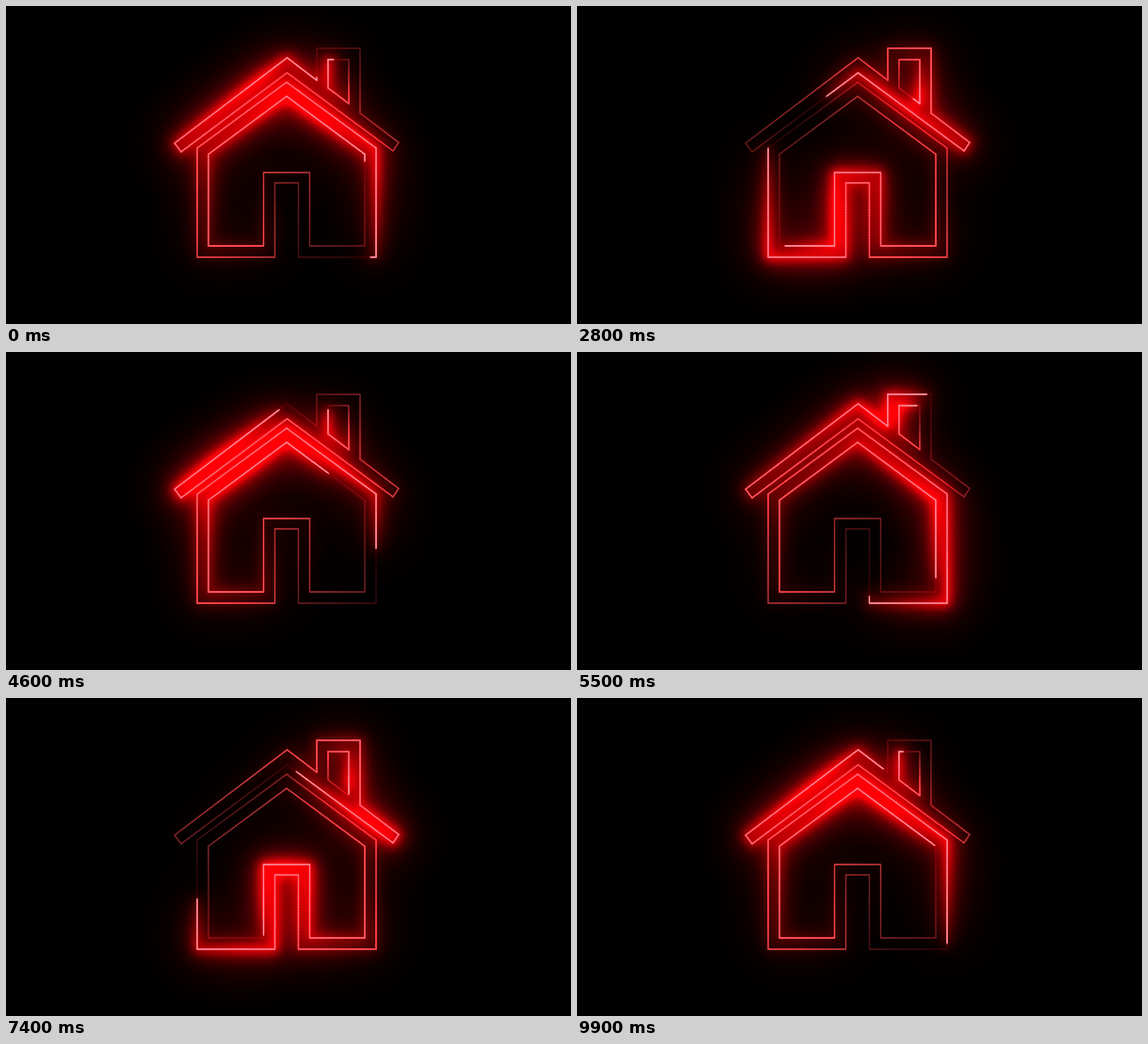
These frames come from a looping animation (600 px wide and 338 px high, 10000 ms). An HTML page with a canvas:

```html
<!DOCTYPE html>
<html lang="en">
<head>
<meta charset="utf-8">
<title>Neon house</title>
<style>
  html, body { margin: 0; width: 100%; height: 100%; overflow: hidden; background: #000; }
  canvas { display: block; width: 100%; height: 100%; }
</style>
</head>
<body>
<canvas id="stage" width="600" height="338"></canvas>
<script>
const W = 600, H = 338;
const LOOP = 10000, STEP = 100, LAP = 4984;
const PIECE = 1.5;
const MID = 298.5;

const makeLayer = () => {
  const c = document.createElement('canvas');
  c.width = W;
  c.height = H;
  return c.getContext('2d');
};
const ctx = document.getElementById('stage').getContext('2d');
const core = makeLayer(), glow = makeLayer();

// Point on the upper roof edge, optionally lifted off it
const onRoof = (x, lift = 0) => [x, 55 + 0.76 * Math.abs(x - MID) - lift];

function roof() {
  const left = 330, right = 376, top = 45;
  return [
    onRoof(MID), onRoof(left), [left, top], [right, top], onRoof(right),
    onRoof(417), [411, 154], [MID, 71], [186, 155], onRoof(179)
  ];
}

function chimneyHole() {
  const left = 342, right = 364, top = 57;
  return [[left, top], [right, top], onRoof(right, 1), onRoof(left, 1)];
}

// Gabled wall with a door, mirrored about its middle
function wall(peak, half, eave, floor, doorHalf, doorTop) {
  const side = [[half, eave], [half, floor], [doorHalf, floor], [doorHalf, doorTop]];
  const mid = MID - 0.5;
  return [
    [mid, peak],
    ...side.map(([x, y]) => [mid + x, y]),
    ...side.reverse().map(([x, y]) => [mid - x, y])
  ];
}

// Each light starts at a fraction of its own clockwise outline
const outlines = [
  split(0.0618, roof()),
  split(0.0473, chimneyHole()),
  split(0.2935, wall(81, 95, 151, 267, 12.5, 188)),
  split(0.1534, wall(96, 83, 157.5, 255, 24.5, 177))
];

// Cut an outline into short pieces, each knowing its fraction of the lap
function split(start, pts) {
  const pieces = [];
  let total = 0;
  pts.forEach(([x, y], i) => {
    const [nx, ny] = pts[(i + 1) % pts.length];
    const len = Math.hypot(nx - x, ny - y);
    const n = Math.ceil(len / PIECE);
    const dx = (nx - x) / n, dy = (ny - y) / n;
    for (let k = 0; k < n; k++) {
      pieces.push({
        x: x + dx * k, y: y + dy * k, dx, dy,
        at: total + len * (k + 0.5) / n
      });
    }
    total += len;
  });
  for (const p of pieces) p.at /= total;
  return { start, pieces };
}

function clear(c) {
  c.globalCompositeOperation = 'source-over';
  c.fillStyle = '#000';
  c.fillRect(0, 0, W, H);
  c.globalCompositeOperation = 'lighten';
  c.lineCap = 'round';
}

function line(c, p, width, r, g, b) {
  c.lineWidth = width;
  c.strokeStyle = `rgb(${r | 0},${g | 0},${b | 0})`;
  c.beginPath();
  c.moveTo(p.x, p.y);
  c.lineTo(p.x + p.dx, p.y + p.dy);
  c.stroke();
}

function drawOutline({ start, pieces }, time) {
  const head = start + time / LAP;
  for (const p of pieces) {
    const age = ((head - p.at) % 1 + 1) % 1;
    const lit = 1 - age;
    const hot = 150 * lit;
    line(core, p, 1.3, 255 * Math.min(1, 0.1 + 1.6 * lit), hot, hot * 1.08);
    // The glow swells just behind the head, then dies away
    const g = Math.min(1, 0.15 + age / 0.15) * lit ** 3;
    line(glow, p, 8, 255 * g, 0, 8 * g);
  }
}

function addGlow(blur, gain) {
  ctx.filter = `blur(${blur}px)`;
  for (let left = gain; left > 0; left--) {
    ctx.globalAlpha = Math.min(1, left);
    ctx.drawImage(glow.canvas, 0, 0);
  }
  ctx.filter = 'none';
  ctx.globalAlpha = 1;
}

function draw(time) {
  clear(core);
  clear(glow);
  for (const o of outlines) drawOutline(o, time);

  ctx.globalCompositeOperation = 'source-over';
  ctx.fillStyle = '#000';
  ctx.fillRect(0, 0, W, H);
  ctx.globalCompositeOperation = 'lighter';
  addGlow(4, 0.8);
  addGlow(10, 1.4);
  addGlow(26, 2);
  ctx.drawImage(core.canvas, 0, 0);
}

let shown = -1;
function tick() {
  const step = Math.floor(performance.now() % LOOP / STEP);
  if (step !== shown) {
    shown = step;
    draw(step * STEP);
  }
  requestAnimationFrame(tick);
}
tick();
</script>
</body>
</html>
```
